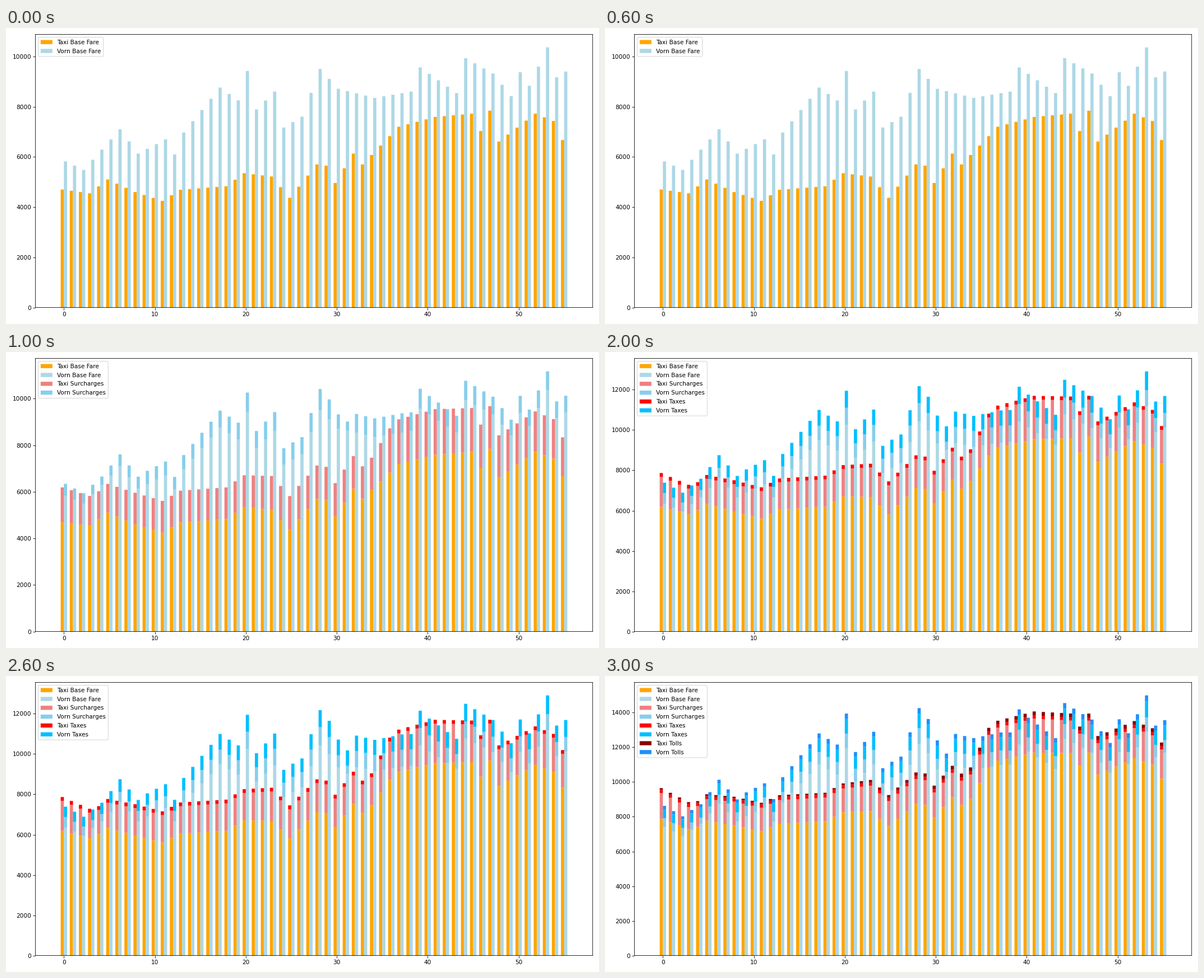
These frames come from a looping animation (1058 by 529 pixels, 4 s). A matplotlib script:

```python
import numpy as np
import matplotlib.pyplot as plt
from matplotlib.animation import FuncAnimation

WIDTH, HEIGHT = 1058, 529
DPI = WIDTH / 14
BAR_WIDTH = 0.35
PARTS = ["Base Fare", "Surcharges", "Taxes", "Tolls"]

plt.rcParams["font.family"] = "DejaVu Sans"
plt.rcParams["path.snap"] = False  # soft sub-pixel edges

weeks = np.arange(56)


def trend(key_weeks):
    """Straight lines between a few key weeks."""
    return np.interp(weeks, list(key_weeks), list(key_weeks.values()))


taxi_base = trend({
    0: 4700, 3: 4550, 5: 5100, 8: 4600, 11: 4250, 13: 4690, 18: 4830, 20: 5350,
    23: 5220, 25: 4370, 28: 5700, 29: 5650, 30: 4960, 32: 6130, 33: 5700,
    37: 7200, 41: 7590, 45: 7720, 46: 7030, 47: 7840, 48: 6610, 52: 7720,
    54: 7430, 55: 6670})
vorn_base = trend({
    0: 5820, 2: 5480, 6: 7100, 8: 6130, 11: 6700, 12: 6100, 13: 6970, 17: 8760,
    19: 8250, 20: 9420, 21: 7890, 23: 8600, 24: 7170, 26: 7600, 28: 9500,
    30: 8710, 34: 8350, 38: 8600, 39: 9560, 43: 8540, 44: 9930, 47: 9320,
    49: 8420, 50: 9370, 51: 8830, 53: 10360, 54: 9170, 55: 9400})

# Surcharges of the second service are a share of its fare.
taxi_surcharges = trend({0: 1490, 4: 1200, 8: 1360, 20: 1360, 23: 1460, 34: 1390,
                         36: 1900, 41: 1960, 55: 1670})
vorn_surcharges = vorn_base * trend({0: 0.09, 2: 0.084, 4: 0.058, 9: 0.092, 17: 0.083,
                                     25: 0.1, 29: 0.095, 31: 0.046, 32: 0.095,
                                     37: 0.098, 40: 0.087, 55: 0.077})
taxi_tolls = trend({0: 100, 18: 95, 31: 220, 55: 220})

# Name, bar offset, cost parts and their colours.
SERVICES = [
    ("Taxi", -BAR_WIDTH / 2,
     [taxi_base, taxi_surcharges, np.full(weeks.size, 188), taxi_tolls],
     ["orange", "lightcoral", "red", "darkred"]),
    ("Vorn", BAR_WIDTH / 2,
     [vorn_base, vorn_surcharges, 0.0895 * vorn_base, 0.033 * vorn_base],
     ["lightblue", "skyblue", "deepskyblue", "dodgerblue"]),
]

fig, ax = plt.subplots(figsize=(14, 7), dpi=DPI)
fig.subplots_adjust(left=52.4 / WIDTH, right=1046.7 / WIDTH,
                    bottom=1 - 499.6 / HEIGHT, top=1 - 11.4 / HEIGHT)


def stack_levels(parts, step):
    """Bar tops at a step: each step starts from the previous step's total."""
    start = parts[0]
    for k in range(1, step):
        start = start + sum(parts[1:k + 1])
    return np.cumsum([start, *parts[1:step + 1]], axis=0)


def draw(step):
    ax.clear()
    levels = [stack_levels(parts, step) for _, _, parts, _ in SERVICES]
    for k in range(step + 1):
        for (name, offset, _, colors), tops in zip(SERVICES, levels):
            bottom = tops[k - 1] if k else np.zeros(weeks.size)
            ax.bar(weeks + offset, tops[k] - bottom, BAR_WIDTH, bottom=bottom,
                   color=colors[k], label=f"{name} {PARTS[k]}")
    ax.legend(loc="upper left", labelspacing=0.555)


anim = FuncAnimation(fig, draw, frames=len(PARTS), init_func=lambda: None,
                     interval=1000, repeat=True, repeat_delay=0)
plt.show()
```
